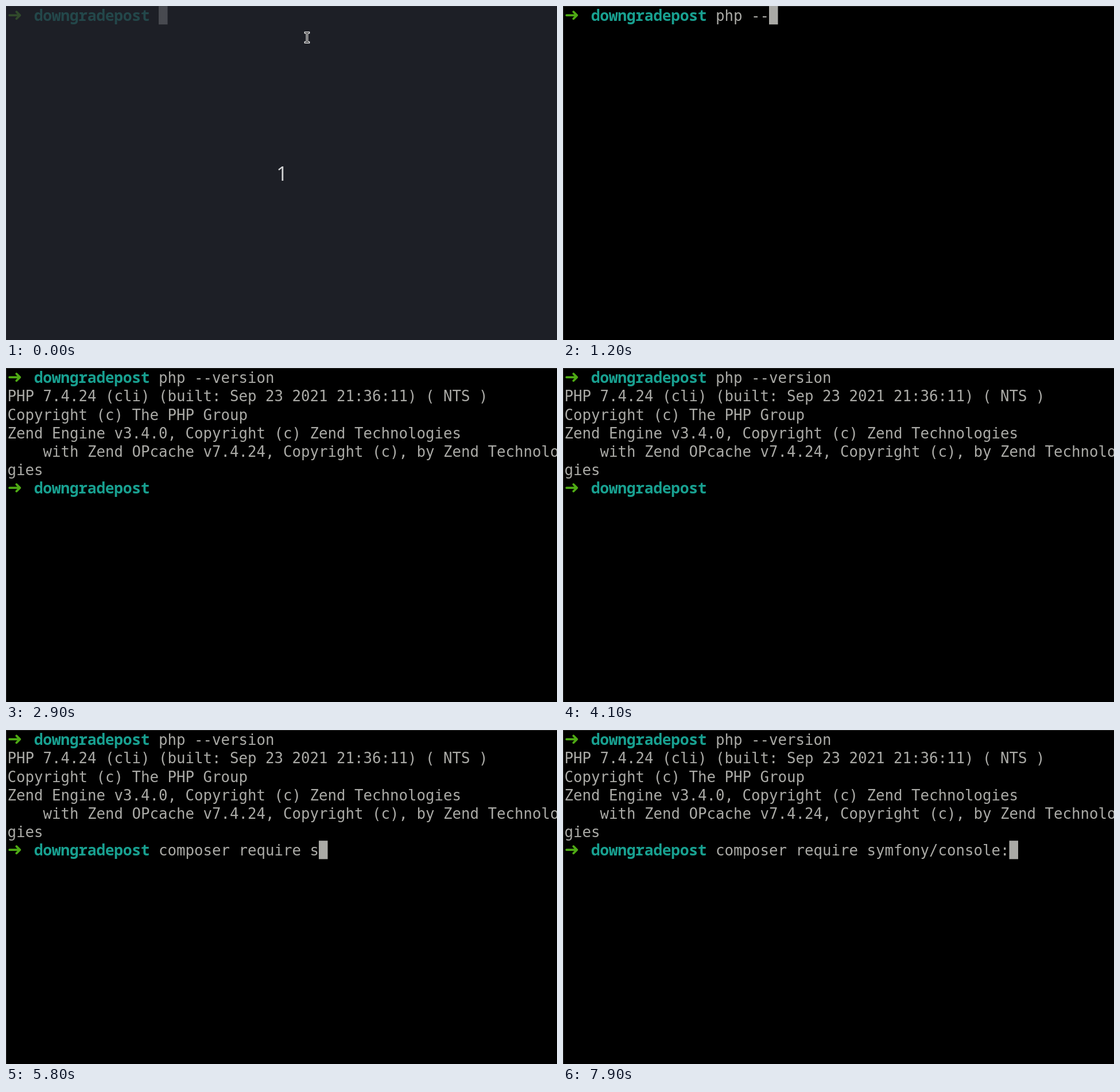
These frames come from a looping animation (960 by 583 pixels, 8000 ms). An HTML page with a canvas:

```html
<!DOCTYPE html>
<html lang="en">
<head>
<meta charset="utf-8">
<title>Terminal session</title>
<style>
  html, body { margin: 0; width: 100%; height: 100%; overflow: hidden; background: #000; }
  canvas { display: block; }
</style>
</head>
<body>
<canvas id="stage" width="960" height="583"></canvas>
<script>
const ctx = document.getElementById('stage').getContext('2d');
const LOOP = 8000, STEP = 100, BLINK = 600, ENTER = 2300;
const LEFT = 2.5, CELL = 15.5, ROW = 32.2, BASELINE = 26.2, PROMPT = 17;
const GREY = '#aaaaa6', GREEN = '#4eaa14', CYAN = '#18a090';
const REGULAR = '25.75px "DejaVu Sans Mono", monospace';
const BOLD = 'bold 26.4px "Noto Sans Mono", monospace';
const SYMBOL = 'bold 31px "DejaVu Sans", sans-serif';

const OUTPUT = [
  'PHP 7.4.24 (cli) (built: Sep 23 2021 21:36:11) ( NTS )',
  'Copyright (c) The PHP Group',
  'Zend Engine v3.4.0, Copyright (c) Zend Technologies',
  '    with Zend OPcache v7.4.24, Copyright (c), by Zend Technolo',
  'gies'
];

// Bursts of typing: text, start in ms, number of screen updates it is spread over
const VERSION = [['php ', 700, 2], ['--', 1200, 1], ['version', 1400, 6]];
const REQUIRE = [
  ['comp', 4400, 4], ['oser require ', 4900, 8], ['s', 5800, 1], ['ymfon', 6000, 4],
  ['y', 6500, 1], ['/conso', 6700, 4], ['l', 7200, 1], ['e', 7600, 1], [':', 7900, 1]
];

function typed(bursts, t) {
  return bursts.map(([text, start, steps]) => {
    const done = Math.min(steps, Math.max(0, Math.floor((t - start) / STEP) + 1));
    return text.slice(0, Math.round(text.length * done / steps));
  }).join('');
}

// The cursor blinks when idle; every key press makes it solid again
function cursorVisible(t) {
  let last = t < ENTER ? -200 : ENTER;
  for (const [, start, steps] of [...VERSION, ...REQUIRE])
    if (t >= start) last = Math.max(last, Math.min(t, start + (steps - 1) * STEP));
  return Math.floor((t - last) / BLINK) % 2 === 0;
}

function write(text, row, col, color = GREY, font = REGULAR) {
  ctx.font = font;
  ctx.textAlign = 'center';
  ctx.fillStyle = color;
  [...text].forEach((ch, i) =>
    ctx.fillText(ch, LEFT + (col + i + 0.5) * CELL, BASELINE + row * ROW));
}

function prompt(row, command) {
  ctx.font = SYMBOL;
  ctx.textAlign = 'left';
  ctx.fillStyle = GREEN;
  ctx.fillText('➜', LEFT, BASELINE + row * ROW);
  write('downgradepost', row, 3, CYAN, BOLD);
  write(command, row, PROMPT);
}

function cursor(row, col) {
  ctx.fillStyle = GREY;
  ctx.fillRect(LEFT + col * CELL, row * ROW, CELL, ROW);
}

function line(path, color, width) {
  ctx.strokeStyle = color;
  ctx.lineWidth = width;
  ctx.stroke(new Path2D(path));
}

function pointer() {
  const beam = 'M521.5 46.5H523.5L524.5 47.5L525.5 46.5H527.5M524.5 47V63' +
               'M521.5 63.5H523.5L524.5 62.5L525.5 63.5H527.5';
  ctx.lineCap = 'square';
  line(beam, '#fff', 3.6);
  line(beam, '#000', 1.2);
  ctx.lineCap = 'butt';
}

function countdown() {
  ctx.fillStyle = 'rgba(39, 42, 51, 0.75)';
  ctx.fillRect(0, 0, 960, 583);
  ctx.font = '35px "Open Sans", sans-serif';
  ctx.textAlign = 'center';
  ctx.fillStyle = '#d3d4d5';
  ctx.fillText('1', 481, 305);
}

function draw(t) {
  ctx.fillStyle = '#000';
  ctx.fillRect(0, 0, 960, 583);
  line('M0 .5H960M.5 0V583', '#2a2a2a', 1);

  const entered = t >= ENTER;
  const version = typed(VERSION, t), require = typed(REQUIRE, t);
  prompt(0, version);
  if (entered) {
    OUTPUT.forEach((text, i) => write(text, i + 1, 0));
    prompt(6, require);
  }
  if (cursorVisible(t))
    cursor(entered ? 6 : 0, PROMPT + (entered ? require : version).length);
  if (t < 100) countdown();
  if (t < 500) pointer();
}

function tick() {
  draw(performance.now() % LOOP);
  requestAnimationFrame(tick);
}
tick();
</script>
</body>
</html>
```
